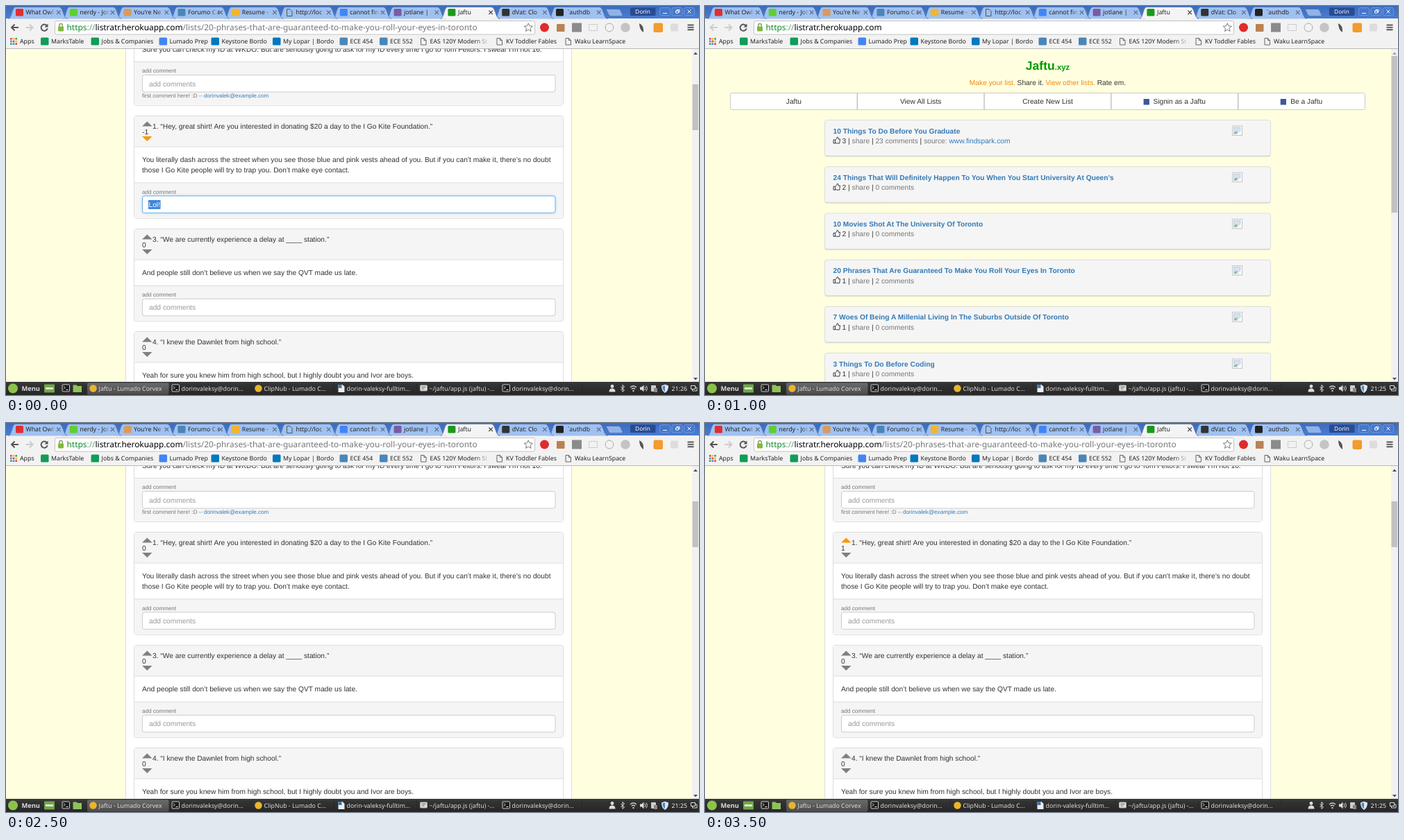
Write an HTML page that moves like this. It is 998 by 561 pixels and loops after 4000 ms.

```html
<!DOCTYPE html>
<html lang="en">
<head>
<meta charset="utf-8">
<title>Jaftu</title>
<style>
  html, body { margin: 0; width: 100%; height: 100%; overflow: hidden; background: #ffffe0; }
  svg { display: block; width: 998px; height: 561px; }
  text { white-space: pre; text-rendering: geometricPrecision; font: 10.23px "Liberation Sans", Arial, sans-serif; fill: #333; }
  .ui { font: 8.8px "Noto Sans", "Open Sans", sans-serif; fill: #222; }
  .url { font-size: 11.9px; fill: #000; }
  .task { fill: #ddd; }
  .small { font-size: 8.1px; fill: #777; }
  .hint { fill: #999; }
  .grey { fill: #777; }
  .link { fill: #337ab7; }
  .bold { font-weight: bold; }
  .head { font-size: 17.6px; font-weight: bold; fill: #090; }
  .mid { text-anchor: middle; }
  .scene { visibility: hidden; animation: show 4s step-end infinite; }
  @keyframes show { 0% { visibility: visible; } 12.5%, 100% { visibility: hidden; } }
</style>
</head>
<body>
<svg id="stage" viewBox="0 0 998 561" xmlns="http://www.w3.org/2000/svg"></svg>
<script>
const text = (x, y, s, cls = '', more = '') => `<text x="${x}" y="${y}" class="${cls}" ${more}>${s}</text>`;
const span = (s, fill) => `<tspan fill="${fill}">${s}</tspan>`;
const rect = (x, y, w, h, fill, more = '') => `<rect x="${x}" y="${y}" width="${w}" height="${h}" fill="${fill}" ${more}/>`;
const box = (x, y, w, h, fill, line = '#ccc', r = 3) => rect(x, y, w, h, fill, `stroke="${line}" rx="${r}"`);
const dot = (x, y, r, fill, more = '') => `<circle cx="${x}" cy="${y}" r="${r}" fill="${fill}" ${more}/>`;
const shape = (d, fill) => `<path d="${d}" fill="${fill}"/>`;
const stroke = (d, color, w = 1) => `<path d="${d}" fill="none" stroke="${color}" stroke-width="${w}"/>`;
const rule = (x1, x2, y, color = '#ddd') => stroke(`M${x1} ${y}H${x2}`, color);
const file = x => stroke(`M${x} 46.5h4.5l3 3v6.5h-7.5zM${x + 4.5} 46.5v3h3`, '#666');

const defs = `<defs>
  <linearGradient id="strip" x2="0" y2="1"><stop stop-color="#3a6bbd"/><stop offset="1" stop-color="#4a7ed3"/></linearGradient>
  <linearGradient id="bar" x2="0" y2="1"><stop stop-color="#3c3c3c"/><stop offset=".2" stop-color="#333"/><stop offset="1" stop-color="#262626"/></linearGradient>
  <linearGradient id="task" x2="0" y2="1"><stop stop-color="#6a6a6a"/><stop offset="1" stop-color="#4c4c4c"/></linearGradient>
  <linearGradient id="fadeTab"><stop stop-color="#a0c1f0" stop-opacity="0"/><stop offset="1" stop-color="#a0c1f0"/></linearGradient>
  <linearGradient id="fadeBar"><stop stop-color="#f2f2f2" stop-opacity="0"/><stop offset="1" stop-color="#f2f2f2"/></linearGradient>
  <clipPath id="page"><rect y="62" width="998" height="480"/></clipPath>
  <filter id="glow" x="-5%" y="-50%" width="110%" height="200%"><feGaussianBlur stdDeviation="2"/></filter>
</defs>`;

// Browser frame

const tabs = [
  ['What Owl', '#e02f2f'], ['nerdy - Jot', '#5fcf2e'], ["You're Ne", '#d99a5b'], ['Forumo Ca', '#4a86b8'],
  ['Resume -', '#f2b52d'], ['http://loc', ''], ['cannot fin', '#4285f4'], ['jotlane |', '#7a5ba6'],
  ['', '#1a9a1a'], ['dVat: Clo', '#333'], [' `authdb', '#222']
];

function tab([name, color], i) {
  const x = 4.5 + 77.8 * i, on = i === 8, fill = on ? '#f4f4f4' : '#a0c1f0';
  const icon = color ? rect(x + 9.5, 4, 11, 10.5, color, 'rx="1.5"')
    : stroke(`M${x + 11} 4.5h4.5l3 3v7h-7.5z`, '#555');
  return `<path d="M${x - 1} 18.5C${x + 4} 18 ${x + 4} 1.5 ${x + 9} 1.5H${x + 72}C${x + 78} 1.5 ${x + 78} 18 ${x + 84} 18.5" fill="${fill}" stroke="#4b6fa8" stroke-width=".7"/>`
    + icon + text(x + 24, 12.3, name, 'ui')
    + (on ? '' : rect(x + 57, 3, 10, 13, 'url(#fadeTab)'))
    + stroke(`M${x + 68.5} 6.5l5.5 5.5m0-5.5l-5.5 5.5`, on ? '#444' : '#5b7194', 1.1);
}

function bookmarks() {
  const items = [
    [65, 'MarksTable', '#0f9d58'], [137.5, 'Jobs &amp; Companies', '#0f9d58'], [235.5, 'Lumado Prep', '#4285f4'],
    [310.5, 'Keystone Bordo', '#0079bf'], [399, 'My Lopar | Bordo', '#0079bf'], [495.5, 'ECE 454', '#4a86b8'],
    [553, 'ECE 552', '#4a86b8'], [610.5, 'EAS 120Y Modern St'], [720, 'KV Toddler Fables'], [819, 'Waku LearnSpace']
  ];
  const colors = ['#e8453c', '#f9bb2d', '#3aa757', '#4688f1'];
  let out = text(20, 54, 'Apps', 'ui');
  for (let i = 0; i < 9; i++) out += rect(6 + i % 3 * 3.7, 46 + (i / 3 | 0) * 3.7, 2.6, 2.6, colors[i % 4]);
  for (const [x, name, color] of items)
    out += (color ? rect(x - 15, 45.5, 11.5, 11, color, 'rx="1.5"') : file(x - 13)) + text(x, 54, name, 'ui');
  return out + rect(676, 44, 20, 15, 'url(#fadeBar)');
}

function extensions() {
  return dot(775.5, 31, 6.5, '#e02b2b') + rect(793, 26, 11.5, 11, '#b98252', 'rx="1"')
    + rect(815, 24.5, 14, 13, '#8b8b8b') + stroke('M839.5 26.5h12v9h-12z', '#ccc')
    + dot(869, 31, 6, 'none', 'stroke="#aaa"') + dot(892, 31, 6.8, '#c4c4c4')
    + shape('M912 25q7 3 6 13q-6-4-6-13', '#555') + rect(932.5, 24.5, 13.5, 13.5, '#f39b2d', 'rx="2.5"')
    + rect(957, 25.5, 11, 11, '#dcdcdc', 'rx="2"')
    + stroke('M981.5 27.5h9m-9 3.4h9m-9 3.4h9', '#555', 1.9);
}

function chrome() {
  return rect(0, 0, 998, 18.5, 'url(#strip)') + rect(0, 18, 998, 44, '#f2f2f2')
    + tabs.map(tab).reverse().join('') + tab(tabs[8], 8)
    + '<path d="M864 4.5h18q2 0 3 2l3 6.5q0 1.5-2 1.5h-15q-2 0-3-2z" fill="#8fb2e8" stroke="#4b6fa8" stroke-width=".7"/>'
    + rect(899, 2.5, 36.5, 11.5, '#274c94', 'rx="1.5"') + text(917, 11, 'Dorin', 'ui mid', 'style="fill:#fff;font-size:8.3px"')
    + [949, 966.5, 984].map(x => box(x - 7.5, 2.5, 15, 11, '#4678ca', '#6f97dc', 2)).join('')
    + stroke('M946 10.5h6M964.5 9.5v-2.5h4v3h-4zM966 7v-1.5h4v3h-1.5M981.5 5.5l5 5m0-5l-5 5', '#fff')
    + box(70.5, 21.5, 691, 19.5, '#fff', '#c4c4c4', 2)
    + stroke('M28.5 31h10m-4.5-4.5l4.5 4.5l-4.5 4.5', '#ccc', 2)
    + stroke('M59 28.5a4.6 4.6 0 1 0 .7 3.8', '#555', 1.9) + shape('M60.5 25.5v5h-5z', '#555')
    + rect(75, 29.5, 8, 7, '#83b83e', 'rx="1"') + stroke('M76.7 30v-2.2a2.3 2.3 0 0 1 4.6 0v2.2', '#83a060', 1.4)
    + stroke('M752.3 24.8l1.8 4 4.3.4-3.3 2.9 1 4.3-3.8-2.3-3.8 2.3 1-4.3-3.3-2.9 4.3-.4z', '#777')
    + extensions() + bookmarks() + rule(0, 998, 61.5, '#b8b8b8');
}

function taskbar() {
  const tasks = ['', 'dorinvaleksy@dorin...', 'ClipNub - Lumado C...', 'dorin-valeksy-fulltim...', '~/jaftu/app.js (jaftu) -...', 'dorinvaleksy@dorin...'];
  const term = x => box(x, 546, 10.5, 10, '#1c1c1c', '#ccc', 1) + stroke(`M${x + 2} 548.5l2 2-2 2m3.5 1h3`, '#eee');
  let out = rect(0, 542, 998, 19, 'url(#bar)') + dot(10, 551.5, 7, '#8bc34a')
    + text(22.5, 555, 'Menu', 'ui task', 'style="font-size:9.3px;font-weight:600"')
    + rect(55, 545.5, 15, 12, '#6fa64a', 'rx="1"') + rect(57, 550, 11, 3, '#d7e8c8')
    + term(81) + shape('M96.5 546.5h5l1.5 1.5h6v9h-12.5z', '#8fc25a')
    + rect(117, 543.5, 117.5, 17, 'url(#task)', 'rx="2"');
  tasks.forEach((name, i) => {
    const x = 133.5 + 119 * i;
    out += (i === 1 || i === 5 ? term(x - 13.5)
      : i === 3 ? shape(`M${x - 12} 546h6l3 3v8h-9z`, '#eee') + rect(x - 12, 546, 5, 5, '#3c78b4')
      : i === 4 ? box(x - 13, 547, 10, 8, '#ddd', '#aaa', 1) + stroke(`M${x - 11} 549.5h6m-6 2.5h4`, '#765')
      : dot(x - 8, 551.5, 5.2, '#e9b52c')) + text(x, 554.7, name, 'ui task');
    if (i) out += stroke(`M${x + 101} 544v15`, '#292929');
  });
  return out + dot(873, 548.5, 2.4, '#ddd') + shape('M868.5 556.5q0-5 4.5-5t4.5 5z', '#ddd')
    + stroke('M885.5 549l5 5-2.5 2.5v-10l2.5 2.5-5 5', '#ddd')
    + stroke('M899 550q4.5-4 9 0m-7.2 2.5q2.7-2.5 5.4 0', '#ccc', 1.3) + dot(903.5, 555, 1.2, '#ccc')
    + shape('M913 549.5h2.5l3-3v10l-3-3h-2.5z', '#ddd') + stroke('M920 549q2 2.5 0 5m2-6.5q3 4 0 8', '#ddd')
    + rect(929, 547, 7, 9, '#ccc', 'rx="1"') + rect(933, 551, 5, 6, '#888')
    + shape('M944 547.5l5-1.8 5 1.8q0 8-5 10.5q-5-2.5-5-10.5', '#dce6f2') + shape('M945.5 548.5l3.5-1.2v9q-3.5-2-3.5-7.8', '#4d85c6')
    + stroke('M986.5 547.5h6v5h-6zM988.5 552.5v2.5h6.5v-5h-2.5', '#ddd');
}

// What changes with each page: address, titles, clock
function status(path, title, task, clock, back = true) {
  return stroke('M18 31h-10m4.5-4.5l-4.5 4.5l4.5 4.5', back ? '#555' : '#ccc', 2)
    + text(87.5, 34.8, span('https', '#0b8a2a') + span('://', '#6a9a72') + 'listratr.herokuapp.com' + span(path, '#777'), 'ui url')
    + text(651, 12.3, title, 'ui') + (title.length > 5 ? rect(684, 3, 10, 13, 'url(#fadeBar)') : '')
    + text(133.5, 554.7, task, 'ui task') + text(958.5, 554.8, clock, 'ui task', 'style="fill:#eee"');
}

function scrollbar(top, bottom) {
  return rect(988, 62, 10, 480, '#f1f1f1') + rect(988.5, top, 8.5, bottom - top, '#c1c1c1')
    + shape('M990 70h6l-3-3.5z', top < 80 ? '#a3a3a3' : '#505050')
    + shape('M990 536h6l-3 3.5z', bottom > 530 ? '#a3a3a3' : '#505050');
}

// Page parts

function field(x, y, w, hint, focus) {
  return (focus ? rect(x, y, w, 24.5, '#66afe9', 'rx="3" opacity=".5" filter="url(#glow)"') : '')
    + box(x, y, w, 24.5, '#fff', focus ? '#66afe9' : '#ccc') + text(x + 9.5, y + 16, hint, 'hint');
}

function header(title, cx, right, labels) {
  const w = (right - 36.5) / labels.length;
  let out = text(cx, 92, title, 'head mid')
    + text(cx, 114, span('Make your list. ', '#f5870a') + 'Share it. ' + span('View other lists. ', '#f5870a') + 'Rate em.', 'mid')
    + box(36.5, 125.5, right - 36.5, 24, '#fff', '#ccc', 2);
  labels.forEach((s, i) => {
    const x = 36.5 + w * i, mark = i > 2;
    if (i) out += stroke(`M${x} 125.5v24`, '#bbb', 1.3);
    if (mark) out += rect(x + (i === 3 ? 46.7 : 61), 134, 8.3, 8.5, '#3b5998');
    out += mark ? text(x + (i === 3 ? 60.5 : 75.5), 141, s) : text(x + w / 2, 141, s, 'mid');
  });
  return out;
}

function brokenImage(x, y) {
  return rect(x, y, 14, 13.5, '#fff', 'stroke="#c4c4c4"') + rect(x + 2, y + 2, 9.5, 9.5, '#d3e2f5', 'stroke="#b5bac2" stroke-width=".7"')
    + shape(`M${x + 2.5} ${y + 11}q2.5-5 5-2.5l-2.500 2.500z`, '#7db36a') + shape(`M${x + 7} ${y + 12}l5-5v5z`, '#fff');
}

function listCard(y, title, likes, comments, source) {
  const bar = span(' | ', '#333');
  return rect(172.5, y + 1, 642, 52, '#d8d8c8', 'rx="3"') + box(172.5, y, 642, 51.5, '#f5f5f5', '#ddd')
    + text(184.5, y + 19, title, 'link bold')
    + stroke(`M185 ${y + 28.5}h2.500v5h-2.500zM187.5 ${y + 28.5}q2.500-1.500 2.800-4q2-.5 1.700 3h2.500l-.8 6h-4l-2.200-.8`, '#333', .95)
    + text(197.5, y + 33.5, span(likes, '#333') + bar + 'share' + bar + comments + ' comments'
      + (source ? bar + 'source: ' + span(source, '#337ab7') : ''), 'grey')
    + brokenImage(759.5, y + 8.5);
}

const stackLists = (top, rows) => rows.map((row, i) => listCard(top + 67.2 * i, ...row)).join('');

function home() {
  return header('Jaftu<tspan font-size="11.4">.xyz</tspan>', 493.5, 950.5,
    ['Jaftu', 'View All Lists', 'Create New List', 'Signin as a Jaftu', 'Be a Jaftu'])
    + stackLists(164.5, [
      ['10 Things To Do Before You Graduate', 3, 23, 'www.findspark.com'],
      ['24 Things That Will Definitely Happen To You When You Start University At Queen’s', 2, 0],
      ['10 Movies Shot At The University Of Toronto', 2, 0],
      ['20 Phrases That Are Guaranteed To Make You Roll Your Eyes In Toronto', 1, 2],
      ['7 Woes Of Being A Millenial Living In The Suburbs Outside Of Toronto', 1, 0],
      ['3 Things To Do Before Coding', 1, 0]
    ]) + scrollbar(72, 298);
}

function listsEnd() {
  return stackLists(72.5, [
    'First List Ever', '3 Things To Do After Coding', '', '5 Things Programmer &amp; Developer Advocates Crave',
    '8 Things That Will Happen To Anyone With Resting Nice Face In Toronto', '', '3 Movies To Watch After Coding'
  ].map(title => [title, 0, 0])) + scrollbar(306, 531);
}

function footer(y, h, hint, focus) {
  return rect(185, y, 617, h - 1, '#f5f5f5') + rule(184.5, 802.5, y) + text(196, y + 15.8, 'add comment', 'small')
    + field(196.5, y + 19, 594.5, hint, focus);
}

function phrase(y, title, lines, vote = 0, focus = false) {
  const foot = y + 81.8 + 14.6 * (lines.length - 1);
  const hue = v => vote === v ? '#ff9500' : '#808080';
  return box(184.5, y, 618, foot + 51.5 - y, '#fff', '#ddd') + rect(185, y + .5, 617, 44, '#f5f5f5', 'rx="2"') + rule(184.5, 802.5, y + 44.5)
    + shape(`M196 ${y + 15}h14.5l-7.25-7z`, hue(1)) + shape(`M196 ${y + 29.5}h14.5l-7.25 7z`, hue(-1))
    + text(196, y + 26.1, vote) + text(211, y + 18.5, title)
    + lines.map((s, i) => text(196, y + 66.7 + 14.6 * i, s)).join('')
    + footer(foot, 51.5, focus ? '' : 'add comments', focus)
    + (focus ? rect(205, foot + 25, 17.5, 13, '#3d85d8') + text(205.5, foot + 35, 'Lol!', '', 'style="fill:#fff"') : '');
}

function detail(vote, shift = 0, focus = false) {
  return `<g transform="translate(0 ${shift})">` + rect(172.5, 40, 642, 540, '#fff', 'stroke="#ddd"')
    + box(184.5, 40, 618, 102.5, '#fff', '#ddd')
    + text(196, 65, 'Sure you can check my ID at WKDO. But are seriously going to ask for my ID every time I go to Tom Feltors. I swear I’m not 16.')
    + footer(79.5, 63, 'add comments') + text(196, 131.4, 'first comment here! :D --', 'small')
    + text(285, 131.4, 'dorinvalek@example.com', 'small', 'style="fill:#337ab7"')
    + phrase(157.5, '1. “Hey, great shirt! Are you interested in donating $20 a day to the I Go Kite Foundation.”', [
      'You literally dash across the street when you see those blue and pink vests ahead of you. But if you can’t make it, there’s no doubt',
      'those I Go Kite people will try to trap you. Don’t make eye contact.'], vote, focus)
    + phrase(320.5, '3. “We are currently experience a delay at ____ station.”', ['And people still don’t believe us when we say the QVT made us late.'])
    + phrase(468.5, '4. “I knew the Dawnlet from high school.”', ['Yeah for sure you knew him from high school, but I highly doubt you and Ivor are boys.'])
    + '</g>' + scrollbar(113, 179);
}

function signup() {
  const rows = [['@', 'Email', 302], ['***', 'Password', 303.5], ['***', 'Confirm Password', 303.5]];
  return header('Jaftu - Signup', 499, 961.5, ['Jaftu', 'View All Lists', 'Create New List'])
    + rect(175, 165.5, 648.5, 227, '#dedecb', 'rx="3"') + box(175, 164.5, 648.5, 227, '#fff', '#ddd')
    + rows.map(([mark, hint, x], i) => {
      const y = 180 + 39.5 * i;
      return box(272.5, y, 40, 24.5, '#eee') + text((272.5 + x) / 2, y + 15.7, mark, 'mid') + field(x, y, 725.5 - x, hint, i === 1);
    }).join('') + stroke('M313 226v11.5', '#222')
    + box(473.5, 298.5, 57.5, 24.5, '#fff') + text(502.2, 314.2, 'signup', 'mid')
    + rule(175.5, 823, 337.5, '#eee') + rect(440.5, 353, 129.5, 24, '#4f6fae', 'rx="1"') + rect(446, 357, 16.5, 16.5, '#fff', 'rx="1"')
    + text(468.5, 368.3, 'Login with Pagefolk', 'bold', 'style="fill:#fff;font-size:9.6px"');
}

// Eight half-second scenes

const article = '/lists/20-phrases-that-are-guaranteed-to-make-you-roll-your-eyes-in-toronto';
const main = 'Jaftu - Lumado Corvex', lists = 'Jaftu - Lists - Lumado ...';
const scenes = [
  [detail(-1, 1, true), article, 'Jaftu', main, '21:26'],
  [home(), '/lists', 'Jaftu - Lis', lists, '21:26'],
  [home(), '', 'Jaftu', main, '21:25', false],
  [listsEnd(), '/lists', 'Jaftu - Lis', lists, '21:26'],
  [detail(-1, 1), article, 'Jaftu', main, '21:26'],
  [detail(0), article, 'Jaftu', main, '21:25'],
  [signup(), '/signup', 'Jaftu - Sig', 'Jaftu - Signup - Luma...', '21:26'],
  [detail(1), article, 'Jaftu', main, '21:25']
];

document.getElementById('stage').innerHTML = defs + rect(0, 0, 998, 561, '#ffffe0') + chrome() + taskbar()
  + scenes.map(([page, ...info], i) => `<g class="scene" style="animation-delay:${(i - 8) / 2}s"><g clip-path="url(#page)">${page}</g>${status(...info)}</g>`).join('');
</script>
</body>
</html>
```
